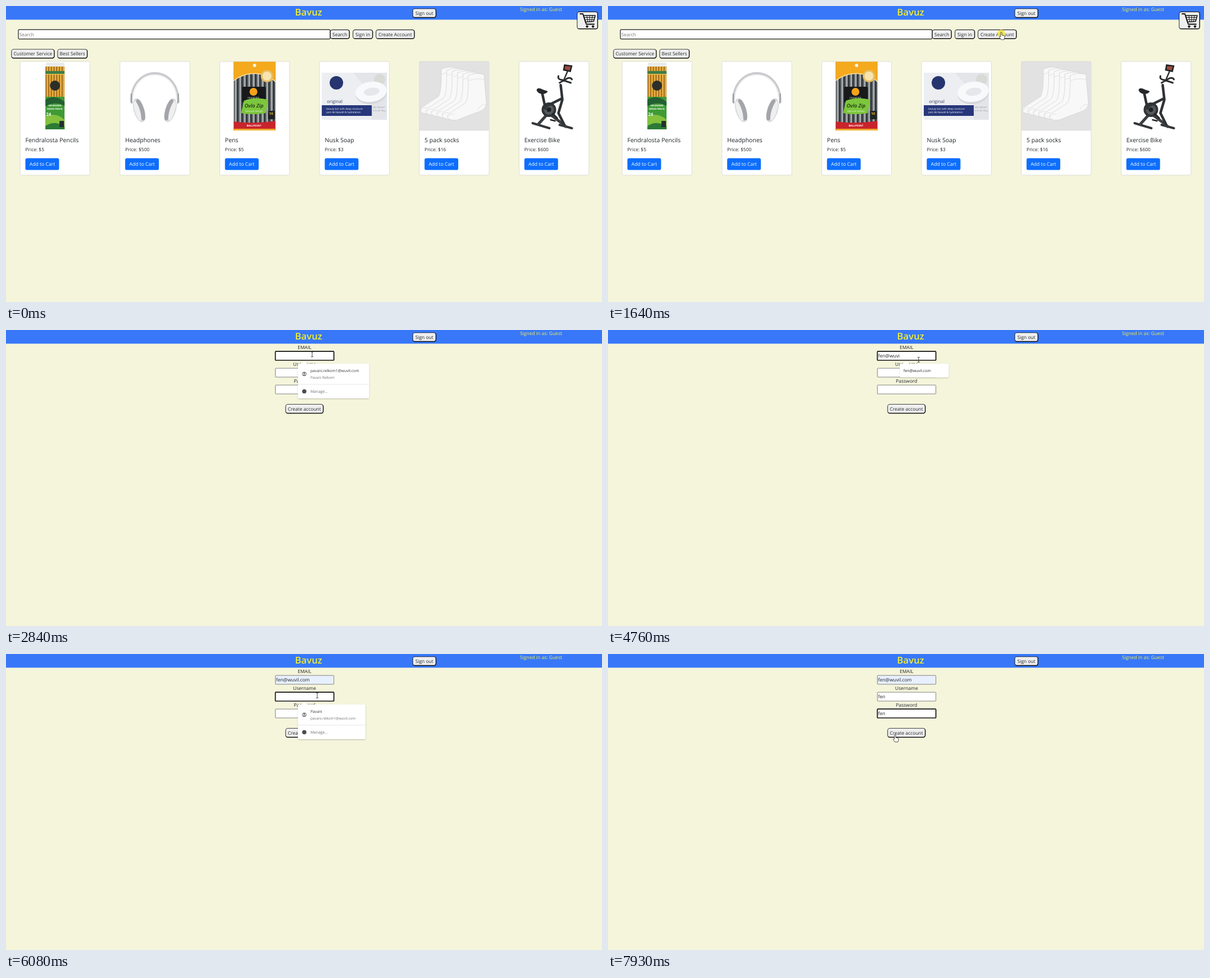
An HTML page that plays this animation: 1061 by 528 pixels, repeating every 8000 ms.

```html
<!DOCTYPE html>
<html lang="en">
<head>
<meta charset="utf-8">
<title>Shop sign-up</title>
<style>
  html, body { margin: 0; width: 100%; height: 100%; overflow: hidden; background: #f5f5dc; }
  svg { display: block; width: 1061px; height: 528px; }
  text { font-family: "Open Sans", "Noto Sans", sans-serif; font-size: 8.45px; fill: #212529;
    text-rendering: geometricPrecision; white-space: pre; }
</style>
</head>
<body>
<svg id="stage" viewBox="0 0 1061 528" xmlns="http://www.w3.org/2000/svg"></svg>
<script>
const LOOP = 8000;
const MAIL = 'fen@wuvil.com', USER = 'fen';
const SAVED_MAIL = 'pavani.relkom1@wuvil.com';

// Drawing helpers
const text = (x, y, s, attrs = '') => `<text x="${x}" y="${y}" ${attrs}>${s}</text>`;
const sized = (px, fill = '#212529', more = '') => `style="font-size:${px}px;fill:${fill};${more}"`;
const rect = (x, y, w, h, fill, rx = 0, more = '') =>
  `<rect x="${x}" y="${y}" width="${w}" height="${h}" rx="${rx}" fill="${fill}" ${more}/>`;
const circle = (x, y, r, fill, more = '') => `<circle cx="${x}" cy="${y}" r="${r}" fill="${fill}" ${more}/>`;
const line = (d, color, w, more = '') =>
  `<path d="${d}" fill="none" stroke="${color}" stroke-width="${w}" stroke-linecap="round" stroke-linejoin="round" ${more}/>`;
const fill = (d, color, more = '') => `<path d="${d}" fill="${color}" ${more}/>`;
const times = (n, f) => Array.from({ length: n }, (_, i) => f(i)).join('');

function button(x, y, w, h, label = '') {
  return rect(x, y, w, h, '#0b0b0b', 4.2) + rect(x + .9, y + .9, w - 2.3, h - 2.3, '#efefef', 3.2) +
    text(x + w / 2 - .2, y + h / 2 + 3.1, label, 'text-anchor="middle"');
}

// Product pictures, drawn inside a 124 by 123 box
const art = {
  pencils: () =>
    rect(46, 2, 33, 14, '#e9ebea', 2) +
    rect(45, 9, 34, 58, '#d99a2b') +
    times(7, i => rect(45.5 + i * 4.8, 9, 1.2, 56, '#8a5a1c') + rect(47.6 + i * 4.8, 9, 1, 56, '#f3c55e')) +
    rect(45, 17, 34, 5, '#3d7d49') + rect(45, 22, 34, 1.5, '#e6c04a') +
    circle(62, 43, 9, '#2c2e2a') +
    rect(45, 63, 34, 58, '#3f9a35', 1) +
    fill('M45 68Q62 58 79 72V79Q62 70 45 80Z', '#245f32') +
    fill('M45 98Q64 90 79 104V121H45Z', '#84c13c') +
    fill('M45 115Q62 104 79 116V121H45Z', '#2c7a36') +
    text(62, 80, 'HB GRADED', 'text-anchor="middle" ' + sized(4, '#fff', 'font-weight:700')) +
    text(62, 86, 'WOOD PENCIL', 'text-anchor="middle" ' + sized(4, '#fff', 'font-weight:700')) +
    text(46, 97, '24', sized(8, '#fff', 'font-weight:700')) +
    rect(70, 106, 8, 11, '#23302a'),

  headphones: () => {
    const cup = (x, a) => `<g transform="translate(${x} 87) rotate(${a})">` +
      '<ellipse rx="9.5" ry="22" fill="#d9dadc"/><ellipse cx="3" rx="6" ry="20" fill="#a3a5a9"/>' +
      '<ellipse cx="-3" rx="4.5" ry="18" fill="#efeff0"/></g>';
    return line('M20 72C20 4 104 4 104 72', '#c9cacd', 4) +
      line('M23 66C26 10 98 10 101 66', '#f1f1f2', 2) +
      line('M20 58L21 74M104 58L103 74', '#97999d', 2) +
      cup(34, -17) + `<g transform="translate(124 0) scale(-1 1)">${cup(34, -17)}</g>`;
  },

  pens: () =>
    rect(25, 0, 74, 123, '#51565a') +
    times(9, i => rect(27 + i * 8, 16, 3, 94, '#a9aeb0') + rect(31 + i * 8, 16, 1.5, 94, '#24282b')) +
    fill('M25 0H99V36C80 18 48 16 25 34Z', '#f5a91c') +
    line('M25 34C48 16 80 18 99 36', '#fbe3a0', 1.5) +
    circle(62, 7, 3, '#f4f4ea') +
    circle(84, 26, 11, '#e6bd62') + circle(84, 26, 8, '#f7e4ae') +
    rect(40, 45, 42, 28, '#17191a', 2) + circle(60, 54, 7, '#f6a21a') +
    text(60, 66, 'round stic', 'text-anchor="middle" ' + sized(4.5, '#fff')) +
    fill('M43 70Q62 62 86 68L82 92Q58 96 38 92Z', '#7cc63c') +
    text(61, 82, 'Ovlo Zip', 'text-anchor="middle" ' + sized(9, '#1d2a1a', 'font-weight:600;font-style:italic')) +
    text(61, 90, 'REGULAR, ROUND', 'text-anchor="middle" ' + sized(3.6, '#fff')) +
    rect(86, 88, 12, 15, '#1f2224') + text(88, 95, '10', sized(6, '#f5c02a', 'font-weight:700')) +
    fill('M25 107Q62 112 99 106V123H25Z', '#c9242c') +
    text(61, 115.5, 'BALLPOINT', 'text-anchor="middle" ' + sized(4.6, '#fff', 'font-weight:700')) +
    rect(25, 120, 74, 3, '#efae2c'),

  soap: () =>
    rect(4, 20, 116, 84, '#eceef1') +
    fill('M60 20H120V104H93V60Z', '#e3e5e9') +
    circle(30, 38, 12, '#26356f') +
    circle(107, 32, 10, '#d9d9d6') +
    `<g transform="rotate(-8 92 56)"><ellipse cx="92" cy="57" rx="28" ry="19" fill="#d5d7da"/>` +
    `<ellipse cx="92" cy="54" rx="28" ry="18" fill="#f8f9fa"/><ellipse cx="93" cy="54" rx="14" ry="7" fill="#e5e7ea"/></g>` +
    text(13, 74, 'original', sized(8, '#3b4468')) +
    rect(4, 78, 89, 19, '#27377a') +
    text(12, 86, 'beauty bar with deep moisture', sized(4.5, '#fff')) +
    text(12, 92, 'pain de beauté &amp; hydratation', sized(4.5, '#fff')) +
    text(95, 83, 'NET WEIGHT', sized(3.6, '#8b8e95')) + text(95, 89, '3.75 OZ 106 g', sized(3.6, '#8b8e95')),

  socks: () =>
    rect(0, 0, 124, 123.5, '#e2e2e2') +
    times(6, i => {
      const k = 5 - i;
      return `<g transform="translate(${-9.6 * k} ${-2.3 * k})">` +
        fill('M87 25Q101 19 115 23L119 70C121 83 113 88 99 92L68 104C52 107 46 99 53 93L82 74Q88 66 87 25Z',
          '#f8f8f8', 'stroke="#cfcfcf" stroke-width=".7"') +
        line('M88 34Q102 29 115 32M50 99Q55 92 62 94M104 87Q106 77 119 76', '#dcdcdc', .8) + '</g>';
    }),

  bike: () =>
    line('M24 110L54 119M72 113L94 119', '#333638', 4) +
    line('M34 112L52 92L76 110L83 116', '#3c3f42', 5) +
    circle(53, 86, 13, '#303336') + circle(53, 86, 9, '#55595d') + circle(53, 86, 4, '#1d1f21') +
    line('M41 56L47 84M48 80L76 66M74 42L77 68L70 92L80 112', '#2f3235', 4.5) +
    line('M60 93L68 101M56 104L64 106', '#222', 2.5) +
    fill('M31 51Q33 45 42 50L51 53Q49 58 41 58Q33 57 31 51Z', '#26282a') +
    line('M70 26Q68 32 77 33L92 38M72 38L86 30Q92 28 94 32', '#2b2d2f', 3) +
    line('M80 32L86 18', '#333', 2.5) +
    fill('M80 5L95 7L92 19L78 16Z', '#1e2023') + fill('M82 8L92 9L90 16L81 14Z', '#9b4a3c')
};

const goods = [
  ['Fendralosta Pencils', 5, 'pencils'], ['Headphones', 500, 'headphones'], ['Pens', 5, 'pens'],
  ['Nusk Soap', 3, 'soap'], ['5 pack socks', 16, 'socks'], ['Exercise Bike', 600, 'bike']
];

const card = ([name, price, pic], i) =>
  `<g transform="translate(${25.2 + i * 177.65} 99)">` +
  rect(0, 0, 124.3, 202.7, '#fff', 2.5) + art[pic]() +
  rect(0, 0, 124.3, 202.7, 'none', 2.5, 'stroke="#d6d7d0" stroke-width=".8"') +
  text(9.3, 143.5, name, sized(10.55, '#212529', 'font-weight:500')) +
  text(9.3, 160.2, 'Price: $' + price) +
  rect(9.3, 172.4, 60, 21.2, '#0d6efd', 3.2) +
  text(39.3, 186.4, 'Add to Cart', 'text-anchor="middle" ' + sized(8.6, '#fff')) + '</g>';

const cart = () => button(1016.4, 10, 37.6, 31.5) +
  line('M1022 14H1027L1033 32.5H1047', '#111', 1.8) +
  line('M1028 17H1049L1046 27.5L1031.5 28.5Z', '#111', 1.6) +
  line('M1029 20.5H1048M1030.5 24.3H1047M1034 17L1035.5 28M1039 17V28M1044 17L1042.5 28', '#111', 1) +
  circle(1034.5, 36.6, 2.2, '#111') + circle(1045, 36.6, 2.2, '#111');

const shop = () =>
  rect(22, 42.2, 555, 16.6, '#fff', 1.5, 'stroke="#1a1a1a" stroke-width="1.2"') +
  text(23.8, 53.7, 'Search', sized(8.3, '#757575')) +
  button(577, 42, 35, 17, 'Search') + button(617.3, 42, 36, 17, 'Sign in') +
  button(658.3, 42, 69.4, 17, 'Create Account') +
  button(9.4, 76.7, 77.2, 17, 'Customer Service') + button(91.5, 76.7, 53.8, 17, 'Best Sellers') +
  goods.map(card).join('') + cart();

// Sign-up form
const labels = ['EMAIL', 'Username', 'Password'];
const form = () => labels.map((s, i) => {
  const y = 30 * i;
  return text(531.5, y + 34.4, s, 'text-anchor="middle"') +
    rect(479.5, y + 38.2, 104.2, 15.8, '#fff', 1, `id="box${i}"`) +
    text(480.8, y + 49.4, '', `id="val${i}"`);
}).join('') + button(497.4, 132.2, 68, 17, 'Create account') + rect(0, 0, .8, 11, '#111', 0, 'id="caret"');

const popup = (id, y, w, h, body) => `<g id="${id}" transform="translate(519.7 ${y})">` +
  `<g filter="url(#soft)">${rect(0, 0, w, h, '#fff', 2)}${fill('M5.5 .3L11.3 -5L17 .3Z', '#fff')}</g>${body}</g>`;

const account = (top, bottom) =>
  circle(11.3, 18.3, 3.4, 'none', 'stroke="#444" stroke-width=".9"') + circle(11.3, 17.3, 1.2, '#444') +
  line('M9.2 20.6Q11.3 18.6 13.4 20.6', '#444', .9) +
  text(22.2, 15, top, sized(6.8, '#33363a')) + text(22.2, 26.8, bottom, sized(6.3, '#6b6e73')) +
  rect(0, 36.6, '100%', .7, '#dcdcdc') + circle(11.3, 49.5, 3.8, '#4a4c50') +
  text(22.2, 52.2, 'Manage...', sized(6.8, '#6b6e73'));

const cursors =
  '<g id="cursor">' + circle(0, 2, 6.8, '#f3e83a', 'id="ring" opacity=".85"') +
  fill('M0 0V9.6L2.3 7.5L3.9 11L5.5 10.3L3.9 7H7Z', '#fff', 'id="arrow" stroke="#222" stroke-width=".8"') +
  fill('M-1.1 8V.7A1.15 1.15 0 0 1 1.2 .7V5L5.2 5.8Q6.3 6.2 6.2 7.5V9.6L5 13H-.2L-3.4 8.6Q-3.2 6.6 -1.1 8Z',
    '#fff', 'id="hand" stroke="#222" stroke-width=".8"') +
  line('M-1.7 -4.7Q0 -4.7 0 -3.6V3.6Q0 4.7 -1.7 4.7M1.7 -4.7Q0 -4.7 0 -3.6M0 3.6Q0 4.7 1.7 4.7', '#333', .9, 'id="beam"') +
  '</g>';

const stage = document.getElementById('stage');
stage.innerHTML =
  '<defs><filter id="soft" x="-10%" y="-20%" width="120%" height="150%">' +
  '<feDropShadow dx="0" dy="1" stdDeviation="1" flood-opacity=".25"/></filter></defs>' +
  rect(0, 0, 1061, 528, '#f5f5dc') + rect(0, 0, 1061, 24.4, '#3878f8') +
  text(538.7, 16.6, 'Bavuz', 'text-anchor="middle" ' + sized(16.7, '#f3ee2e', 'font-weight:600')) +
  button(723.7, 4.4, 42.4, 16.8, 'Sign out') + text(915, 8.8, 'Signed in as: Guest', sized(8.5, '#f6f04a')) +
  `<g id="shop">${shop()}</g><g id="form">${form()}` +
  popup('mailList', 60, 126.8, 62, account(SAVED_MAIL, 'Pavani Relkom').replace('100%', '126.8')) +
  popup('mailHint', 60, 86.7, 24.5, rect(0, 4, 86.7, 16.5, '#fff', 0, 'id="hover"') +
    text(6.4, 15, MAIL, sized(6.9))) +
  popup('userList', 90, 120.2, 62, account('Pavani', SAVED_MAIL).replace('100%', '120.2')) +
  popup('passHint', 120, 86.7, 24.5, text(6.4, 15, USER, sized(6.9))) +
  '</g>' + cursors;

const el = id => document.getElementById(id);
const show = (id, on) => { el(id).style.display = on ? '' : 'none'; };
const between = (t, ...spans) => spans.some(([a, b]) => t >= a && t < b);
const latest = (steps, t) => steps.reduce((v, [at, next]) => t >= at ? next : v, 0);

// Typed letters by time: [ms, length]
const typing = [
  [MAIL, [[3040, 2], [3110, 3], [3440, 4], [3770, 5], [3840, 6], [3900, 7], [4030, 8], [4960, 13]]],
  [USER, [[6410, 1], [6480, 2], [6550, 3]]],
  [USER, [[6800, 1], [6870, 2], [7010, 3]]]
];
const focusSpans = [[2310, 5480], [5480, 6680], [6680, LOOP]];
const caretSpans = [[2310, 2840], [3040, 4560], [5480, 6080], [6410, 7530]];
const clicks = [[1580, 1710], [2240, 2370], [5020, 5150], [5420, 5550]];

// Pointer: [ms, x, y, shape]
const path = [
  [0, 992, 516, ''], [330, 992, 516, 'arrow'], [560, 930, 340, 'arrow'], [800, 800, 130, 'arrow'],
  [980, 704, 45, 'hand'], [1120, 666, 26, 'arrow'], [1300, 680, 42, 'hand'], [1480, 700, 47, 'hand'],
  [1710, 700, 47, 'arrow'], [1980, 632, 50, 'arrow'], [2100, 572, 46, 'beam'], [2220, 545, 43.5, 'beam'],
  [3040, 545, 43.5, ''], [4560, 545, 43.5, 'beam'], [4750, 553, 52.5, 'beam'], [4880, 552, 66, 'arrow'],
  [4980, 551, 72, 'arrow'], [5080, 551, 72, 'arrow'], [5210, 557, 122, 'arrow'], [5280, 556, 100, 'beam'],
  [5380, 554, 74, 'beam'], [6410, 554, 74, ''], [7790, 554, 74, 'beam'], [7840, 530, 112, 'arrow'],
  [7880, 511, 144, 'hand'], [LOOP, 511, 144, 'hand']
];

function drawPointer(t) {
  const row = path.findLast(p => p[0] <= t);
  const q = Math.max(0, Math.floor((t + 45) / (200 / 3)) * 200 / 3 - 45);
  const i = path.findLastIndex(p => p[0] <= q), a = path[i], b = path[i + 1];
  const k = (q - a[0]) / (b[0] - a[0]);
  el('cursor').setAttribute('transform', `translate(${a[1] + (b[1] - a[1]) * k} ${a[2] + (b[2] - a[2]) * k})`);
  for (const shape of ['arrow', 'hand', 'beam']) show(shape, row[3] === shape);
  show('ring', between(t, ...clicks));
}

function draw(t) {
  show('shop', t < 1710);
  show('form', t >= 1710);
  show('caret', between(t, ...caretSpans));
  typing.forEach(([word, steps], i) => {
    const val = el('val' + i), box = el('box' + i), focused = between(t, focusSpans[i]);
    val.textContent = word.slice(0, latest(steps, t));
    box.setAttribute('stroke', focused ? '#101010' : '#767676');
    box.setAttribute('stroke-width', focused ? 1.7 : .9);
    box.setAttribute('fill', i === 0 && t >= 4960 ? '#e8f0fe' : '#fff');
    if (focused) {
      el('caret').setAttribute('x', 480.9 + val.getComputedTextLength());
      el('caret').setAttribute('y', 40.4 + 30 * i);
    }
  });
  show('mailList', between(t, [2370, 3040]));
  show('mailHint', between(t, [4560, 5080]));
  el('hover').setAttribute('fill', t >= 4960 ? '#ececec' : '#fff');
  show('userList', between(t, [5550, 6410]));
  show('passHint', between(t, [6870, 7200]));
  drawPointer(t);
}

const start = performance.now();
function tick() {
  draw((performance.now() - start) % LOOP);
  requestAnimationFrame(tick);
}
tick();
</script>
</body>
</html>
```
